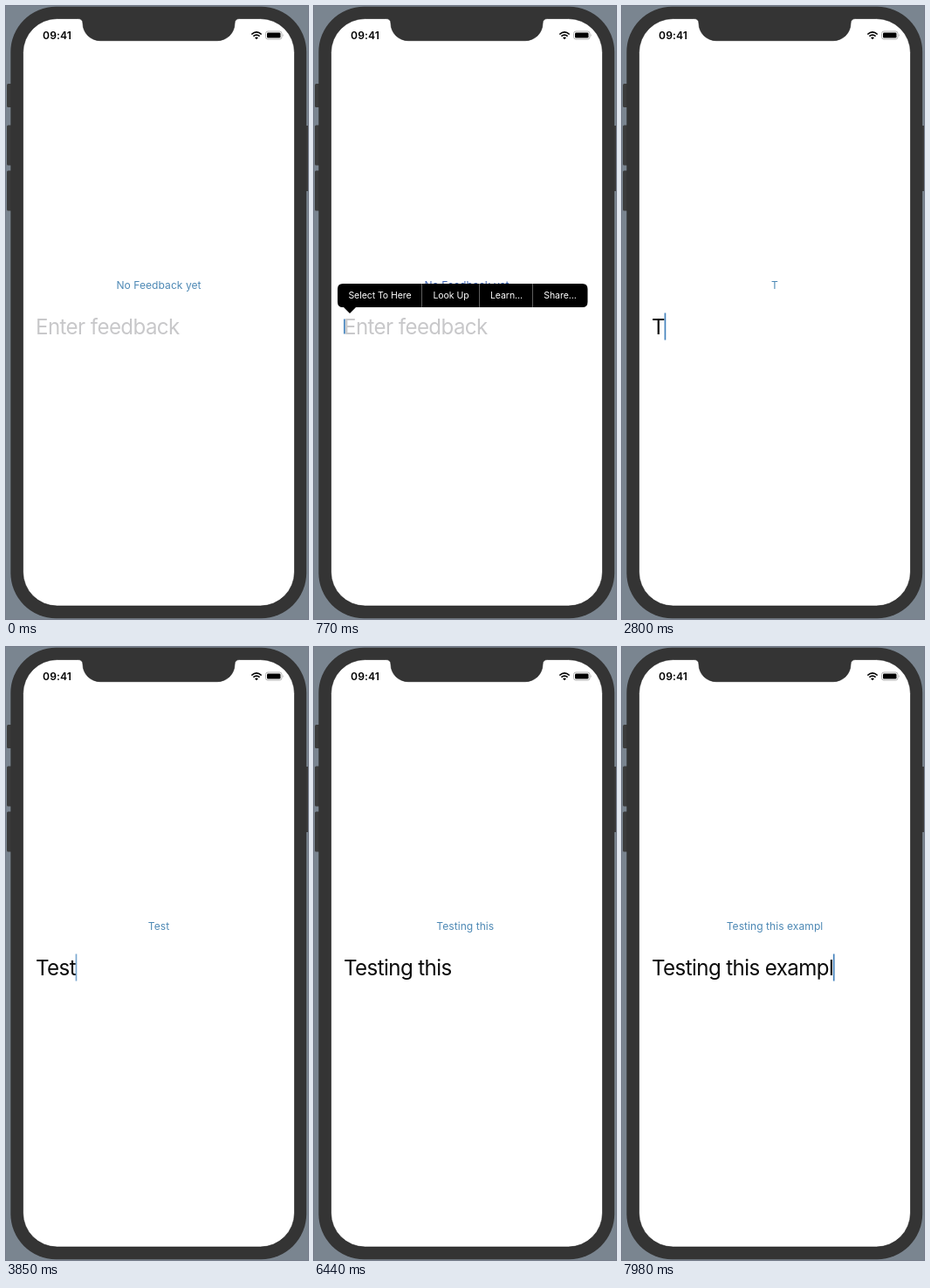
An HTML page that plays this animation: 346x702 px, repeating every 8000 ms.

```html
<!DOCTYPE html>
<html lang="en">
<head>
<meta charset="utf-8">
<title>Feedback field</title>
<style>
  html, body { margin: 0; width: 100%; height: 100%; overflow: hidden; background: #7a8590; }
  svg { display: block; width: 100%; height: 100%; }
  text {
    font-family: Inter, "Liberation Sans", sans-serif;
    font-optical-sizing: none;
    white-space: pre;
  }
  .mid { text-anchor: middle; }
  .clock { font-size: 12.1px; font-weight: 600; letter-spacing: .1px; }
  .label { font-size: 12.05px; letter-spacing: .05px; }
  .field { font-size: 24.1px; letter-spacing: -.58px; }
  .menu { font-size: 10.5px; letter-spacing: -.05px; fill: #fff; }
</style>
</head>
<body>
<svg viewBox="0 0 346 702" preserveAspectRatio="none">
  <rect width="346" height="702" fill="#7a8590"/>

  <g fill="#3b3b3b">
    <rect x="1" y="89" width="8" height="27" rx="1.5"/>
    <rect x="1" y="136.5" width="8" height="46" rx="1.5"/>
    <rect x="1" y="188.5" width="8" height="46" rx="1.5"/>
    <rect x="340" y="137" width="8" height="75" rx="1.5"/>
  </g>
  <rect x="5.3" y=".7" width="338.9" height="700.5" rx="52" fill="#343434"/>
  <path fill="#fff" stroke="#1e1e1e" stroke-width=".6"
    d="M58.5 14.5H82.5Q88 14.5 88 20A20 19.7 0 0 0 108 39.7H242A20 19.7 0 0 0 262 20Q262 14.5 267.500 14.5H291.5
       a39 39 0 0 1 39 39V648a39 39 0 0 1 -39 39H58.5a39 39 0 0 1 -39 -39V53.5a39 39 0 0 1 39 -39Z"/>

  <text class="clock mid" x="58.5" y="38">09:41</text>
  <g fill="none" stroke="#000" stroke-width="1.7">
    <path d="M281.3 32.5Q287 27.2 292.7 32.5"/>
    <path d="M283.4 34.7Q287 31.5 290.6 34.7"/>
  </g>
  <path d="M285 36.2Q287 34.6 289 36.2L287 38.3Z"/>
  <rect x="297.5" y="29" width="18.5" height="9" rx="2.5" fill="#fff" stroke="#a9a9a9" stroke-width=".9"/>
  <rect x="299" y="30.4" width="15.5" height="6.2" rx="1.3"/>
  <path d="M317 32Q318.500 33.5 317 35Z" fill="#a9a9a9"/>

  <text id="label" class="label mid" x="175" y="324" xml:space="preserve"></text>
  <text id="field" class="field" x="34" y="376" xml:space="preserve"></text>
  <rect id="caret" width="1.7" fill="#4583bd"/>

  <g id="menu">
    <path d="M33 318H307.5Q313.5 318 313.5 324V339Q313.5 345 307.5 345H48L41 352L34 345H33Q27 345 27 339V324Q27 318 33 318Z"/>
    <path d="M123.5 318V345M189.5 318V345M250.5 318V345" stroke="#777" stroke-width=".8"/>
    <g class="menu mid">
      <text x="75.5" y="335.3">Select To Here</text>
      <text x="157" y="335.3">Look Up</text>
      <text x="220.5" y="335.3">Learn…</text>
      <text x="282" y="335.3">Share…</text>
    </g>
  </g>
</svg>
<script>
const LOOP = 8000, STEP = 70, BLINK = 1050, TAP = 350;
const $ = id => document.getElementById(id);
const label = $("label"), field = $("field"), caret = $("caret"), menu = $("menu");

// each burst types its text between two moments; pace bends the rhythm
const bursts = [
  { text: "Test", from: 2590, to: 3220, pace: .3 },
  { text: "ing ", from: 3920, to: 4410, pace: 1 },
  { text: "this ", from: 4970, to: 5670, pace: 1.75 },
  { text: "exampl", from: 6860, to: 7980, pace: .75 }
];
const keys = bursts.flatMap(({ text, from, to, pace }) =>
  [...text].map((char, i) => ({
    char,
    time: from + (to - from) * (i / (text.length - 1)) ** pace
  })));

const clamp = v => Math.min(1, Math.max(0, v));
const ramp = (t, from, to) => clamp((t - from) / (to - from));

// solid after each touch, then blinking around the dark middle of the cycle
function caretAlpha(idle) {
  if (idle < 0) return 0;
  if (idle < BLINK / 2) return 1;
  const gap = Math.abs(idle % BLINK - 890);
  return clamp((Math.min(gap, BLINK - gap) - 190) / 100);
}

function set(el, attrs) {
  for (const name in attrs) el.setAttribute(name, attrs[name]);
}

function setText(el, text) {
  if (el.textContent !== text) el.textContent = text;
}

function draw(time) {
  const t = Math.floor(time / STEP) * STEP;
  const pressed = keys.filter(k => k.time <= t);
  const typed = pressed.map(k => k.char).join("");
  const touched = typed ? pressed[pressed.length - 1].time : TAP;
  const menuAlpha = ramp(t, 560, 770) - ramp(t, 2520, 2800);

  setText(label, typed || "No Feedback yet");
  setText(field, typed || "Enter feedback");
  set(label, { fill: !typed && menuAlpha > .5 ? "#3c62b0" : "#4e89b5" });
  set(field, { fill: typed ? "#0a0a0a" : "#c8c8ca" });

  set(caret, {
    x: typed ? 33.6 + field.getComputedTextLength() : 34,
    y: typed ? 351.5 : 358.5,
    height: typed ? 31 : 17,
    opacity: caretAlpha(t - touched)
  });
  set(menu, { opacity: menuAlpha });
}

const start = performance.now();
function tick() {
  draw((performance.now() - start) % LOOP);
  requestAnimationFrame(tick);
}
tick();
</script>
</body>
</html>
```
